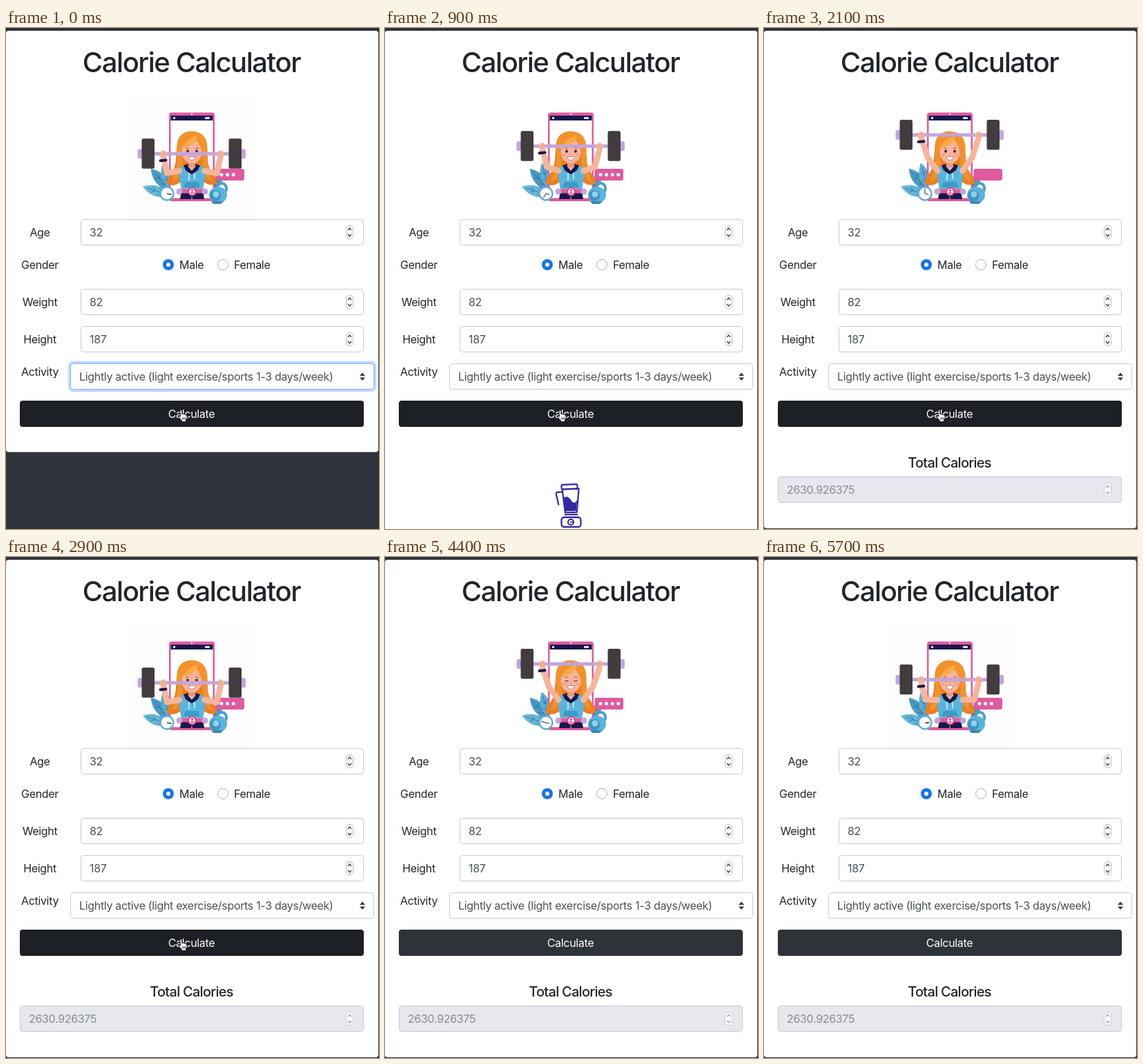
Animation, 540 px wide and 726 px high, one loop 5800 ms. Source, as an HTML page with a canvas:

```html
<!DOCTYPE html>
<html lang="en">
<head>
<meta charset="utf-8">
<title>Calorie Calculator</title>
<style>
html, body { margin: 0; width: 100%; height: 100%; overflow: hidden; background: #2f333b; }
#stage { position: relative; width: 540px; height: 726px; overflow: hidden; }
canvas, svg { position: absolute; left: 0; top: 0; }
span {
  position: absolute; white-space: pre; line-height: 20px; color: #212529;
  font: 400 16px/20px Inter, Roboto, "Liberation Sans", sans-serif;
  letter-spacing: -.02em; font-optical-sizing: none;
}
.mid { transform: translateX(-50%); }
.field { color: #495057; }
</style>
</head>
<body>
<div id="stage">
  <canvas id="view" width="540" height="726"></canvas>
  <svg id="hand" width="540" height="726">
    <path transform="translate(249 553)" fill="#fff" stroke="#15171a" stroke-width="1" stroke-linejoin="round"
      d="M3 2Q3 .5 4.4.5T5.9 2V6.5Q7.6 5.6 8.6 7Q10 6.400 11 7.700Q13 7.500 13 9.500V12Q12.500 14 11.500 15V17.500H5.500V16Q3 13.500 1 10.500Q.5 9 2 8.800L3.500 10.200Z"/>
    <path transform="translate(249 553)" stroke="#15171a" stroke-width=".8" d="M6.700 11V14.500M8.600 11V14.500M10.500 11V14.500"/>
  </svg>
</div>
<script>
const stage = document.getElementById("stage");
const hand = document.getElementById("hand");
const ctx = document.getElementById("view").getContext("2d");
const LOOP = 5800, LIFT = 2900, STEP = 100;
const LOAD_AT = 100, RESULT_AT = 2100, LEAVE_AT = 4300;
const SKIN = "#f6b59b", PINK = "#df5a9e", NAVY = "#17184b", BLUE = "#59b4dc",
      HAIR = "#f3922b", LILAC = "#c3a5dc", INK = "#3528a3";

function label(text, x, y, cls = "", style = {}) {
  const el = document.createElement("span");
  el.textContent = text;
  el.className = cls;
  Object.assign(el.style, { left: x + "px", top: y - 10 + "px" }, style);
  stage.insertBefore(el, hand);
  return el;
}

label("Calorie Calculator", 268.5, 50, "mid", { fontSize: "40px", fontWeight: 500, letterSpacing: "-.036em" });
[["Age", 296], ["Gender", 343], ["Weight", 397], ["Height", 451], ["Activity", 498]]
  .forEach(([s, y]) => label(s, 49, y, "mid"));
[["32", 296], ["82", 397], ["187", 451]].forEach(([s, y]) => label(s, 121, y, "field"));
label("Male", 251, 343);
label("Female", 330, 343);
label("Lightly active (light exercise/sports 1-3 days/week)", 106, 505, "field");
label("Calculate", 268.5, 559, "mid", { color: "#fff" });
const results = [
  label("Total Calories", 268.5, 630, "mid", { fontSize: "20px", fontWeight: 500, letterSpacing: "-.037em" }),
  label("2630.926375", 33, 669, "", { color: "#868c96" })
];

function paint(fill, stroke, width = 1) {
  if (fill) { ctx.fillStyle = fill; ctx.fill(); }
  if (stroke) { ctx.strokeStyle = stroke; ctx.lineWidth = width; ctx.stroke(); }
}
function box(x, y, w, h, r, fill, stroke, width) {
  ctx.beginPath();
  ctx.roundRect(x, y, w, h, r);
  paint(fill, stroke, width);
}
function oval(x, y, rx, ry, fill, stroke, width, turn = 0) {
  ctx.beginPath();
  ctx.ellipse(x, y, rx, ry, turn, 0, Math.PI * 2);
  paint(fill, stroke, width);
}
function shape(d, fill, stroke, width) {
  const p = new Path2D(d);
  if (fill) { ctx.fillStyle = fill; ctx.fill(p); }
  if (stroke) { ctx.strokeStyle = stroke; ctx.lineWidth = width; ctx.stroke(p); }
}

function spinner(y, line, arrow) {
  box(492.5, y - 9.5, 10, 19, 4.5, "#fff", line);
  shape(`M495 ${y - 3}l2.500 -3l2.500 3M495 ${y + 3}l2.500 3l2.500 -3`, null, arrow, 1.3);
}
function input(x, y, w, fill = "#fff") {
  box(x + .5, y - 18.5, w - 1, 37, 4, fill, "#c6cacf");
}

function drawForm(t) {
  [296, 397, 451].forEach(y => { input(108, y, 410); spinner(y, "#b9bbbd", "#3c3e40"); });

  oval(235, 343, 8, 8, "#1673f0");
  oval(235, 343, 3, 3, "#fff");
  oval(314, 343, 7.5, 7.5, "#fff", "#aeb2b7");

  if (t < LOAD_AT) {
    box(91.5, 484.5, 443, 41, 6, null, "#bcdaff", 3.5);
    box(93.5, 486.5, 439, 37, 4, "#fff", "#80b8f5");
  } else input(93, 505, 440);
  shape("M512 504l4 -4.500l4 4.500ZM512 506.500l4 4.500l4 -4.500Z", "#343a40");

  const button = t < LEAVE_AT ? "#1d2024" : t < LEAVE_AT + STEP ? "#272a30" : "#2e3239";
  box(20, 540, 498, 38, 4, button);
}

function leaf(x, y, len, turn, color) {
  ctx.save();
  ctx.translate(x, y);
  ctx.rotate(turn);
  shape(`M0 0Q${-len * .36} ${-len * .5} 0 ${-len}Q${len * .36} ${-len * .5} 0 0Z`, color);
  shape(`M0 0V${-len * .85}M0 ${-len * .3}l5 -5M0 ${-len * .3}l-5 -5M0 ${-len * .55}l4 -5M0 ${-len * .55}l-4 -5`, null, "#2f729f", .8);
  ctx.restore();
}

function barHeight(p) {
  // distance in time from the lowest point of the lift
  const gap = Math.abs((p - 350 + LIFT * 1.5) % LIFT - LIFT / 2);
  const k = Math.min(1, Math.max(0, (gap < 0 ? 0 : gap - 250) / 650));
  return 184 - 29 * (1 - Math.cos(Math.PI * k)) / 2;
}
function dotCount(p) {
  if (p < 200) return 3;
  if (p < 1800) return 4;
  return p < 2200 ? 0 : p < 2400 ? 1 : p < 2600 ? 2 : 3;
}

function drawPhone() {
  box(236, 122.5, 66, 128.5, 4, PINK);
  box(238.5, 127, 61, 119.5, 1, "#fff");
  box(238.5, 127, 61, 7, 0, NAVY);
  oval(269, 125, 1.2, 1.2, "#fff");
  box(242, 129, 3, 3, 0, "#dfe4f5");
  box(288, 129, 7, 3, 1, "#dfe4f5");
}

function drawFace(shut) {
  box(264, 188, 10, 14, 3, "#e79b80");
  shape("M254 170Q255 160 269 159Q284 160 284 171V180Q282 195 269 196Q256 195 254 180Z", SKIN);
  shape("M248 184Q243 151 268 149.500Q296 150 291 186L284 190Q285 174 276 163Q266 172 255 173L254 190Z", HAIR);
  shape("M276 163Q266 172 255 173Q259 163 276 156Z", "#f8ab43");
  shape("M260 174.500q3 -1.500 5 0M274 174.500q3 -1.500 5 0", null, "#a8562c", 1);
  if (shut) shape("M260.500 179q2.500 2 5 0M273.500 179q2.500 2 5 0", null, "#442333", 1.2);
  else {
    oval(263, 178.7, 1.8, 2.1, "#2a1d3a");
    oval(276, 178.7, 1.8, 2.1, "#2a1d3a");
  }
  oval(259.5, 184, 2.5, 1.7, "#f19a8b");
  oval(279, 184, 2.5, 1.7, "#f19a8b");
  shape("M269.500 180v3.500h-1.500", null, "#e18f74", .9);
  shape("M264 186.500H274.500Q273 191.500 269 191.500Q265 191.500 264 186.500Z", "#fff", "#c24f5a", .7);
}

function drawTorso() {
  shape("M253 202Q260 198 264 199L269 205L275 199Q281 198 286 202L289 211L285 235H254L250 211Z", BLUE);
  shape("M257 199Q269 194 281 199L278 206Q274 209 269 212Q263 209 260 206Z", NAVY);
  shape("M263 200H275L269 207Z", SKIN);
  shape("M265 210v11M273 210v9", null, "#fff", 1.2);
  shape("M260 223H278L281 231H257Z", "#3d9bc8");
  box(255, 233, 29, 3, 0, SKIN);
  shape("M254 235H285L287 248H270L269 244L268 248H252Z", NAVY);
  box(249, 233.5, 41, 6, 3, PINK);
  oval(251, 237, 4.5, 4.5, LILAC);
  oval(288, 237, 4.5, 4.5, LILAC);
  oval(269.5, 237, 6.5, 6.5, "#d94a8f");
  oval(269.5, 237, 4.3, 4.3, "#fff");
  oval(269.5, 235.5, 1.8, 1.8, "#d94a8f");
  shape("M266.500 240Q269.500 235.500 272.500 240Z", "#d94a8f");
}

function drawArms(y) {
  const elbowY = 188 + (y - 155) * .82, out = 32 + (y - 155) * .15;
  ctx.lineCap = ctx.lineJoin = "round";
  for (const side of [-1, 1]) {
    const at = d => 269.2 + side * d;
    shape(`M${at(18)} 207L${at(out)} ${elbowY}L${at(41)} ${y + 6}`, null, SKIN, 8.5);
    oval(at(41.5), y + 1, 5, 6, SKIN);
    shape(`M${at(38)} ${y - 1}h${side * 6}M${at(38)} ${y + 2}h${side * 6}`, null, "#e79b80", .8);
  }
  shape(`M223.500 ${y + 10}l8 -.8`, null, NAVY, 4);
  ctx.lineCap = "butt";
  ctx.lineJoin = "miter";
}

function drawBarbell(y) {
  box(190.5, y - 7, 11, 14, 3, LILAC);
  box(336, y - 7, 11, 14, 3, LILAC);
  box(210, y - 2.5, 118, 5, 0, LILAC);
  box(196.5, y - 22, 18.5, 43.5, 2.5, "#423c3e");
  box(322.5, y - 22, 18.5, 43.5, 2.5, "#423c3e");
}

function drawGear(p) {
  oval(233, 240, 9.5, 9.5, "#fff", "#63add5", 2.4);
  shape("M226 231l-2 -2", null, "#4a91c0", 2.5);
  const a = (p - 2100) / LIFT * Math.PI * 2 - Math.PI / 2;
  shape(`M233 240L${233 + 7 * Math.cos(a)} ${240 + 7 * Math.sin(a)}M233 240l5 1.500`, null, "#3b4354", 1.2);

  oval(312, 233, 7, 8, null, "#4b9fca", 4, .3);
  oval(307, 242, 13, 12, BLUE);
  oval(303, 243, 8, 8, "#3f94c2");
  oval(304, 241, 4.5, 4.5, "#8fd0ea");
  shape("M297 251H315L311 255H300Z", "#3f86b5");
}

function drawAthlete(t) {
  const p = t % LIFT, y = barHeight(p);
  if (y > 175) box(179, 97, 180, 180, 0, "#fdfdfd");
  leaf(238, 236, 43, -.72, "#4a9bc5");
  leaf(238, 234, 40, -.28, "#5caed4");
  leaf(238, 243, 42, -1.25, "#65b7da");
  leaf(297, 238, 36, .5, "#4a9bc5");
  drawPhone();
  shape("M249 165C244 185 250 200 236 215Q233 222 232 225Q243 232 254 222H285Q295 231 306 225C303 212 291 207 292 186L288 162Z", "#ea7f22");
  shape("M249 170Q250 200 240 222Q252 222 256 195ZM290 170Q290 200 299 222Q288 222 284 195Z", HAIR);
  box(303.5, 204, 41.5, 17, 3, PINK);
  for (let i = 0; i < dotCount(p); i++) oval(312 + i * 8.6, 212.5, 2.5, 2.5, "#fff");
  drawTorso();
  drawFace((p >= 1400 && p < 1700) || p >= 2700);
  drawBarbell(y);
  drawArms(y);
  drawGear(p);
}

function drawBlender(t) {
  const sway = Math.sin((t - 900) / 160), slosh = 3 * Math.cos((t - 900) / 130);
  ctx.save();
  ctx.lineJoin = "round";
  ctx.translate(269, 708);
  ctx.rotate(-.035 + sway * .035);
  shape("M-11 -40L-8 -6H9L13 -40Z", "#fff", INK, 2.2);
  box(-12, -46.5, 23, 6.5, 2, "#fff", INK, 2.2);
  shape("M-11 -36H-18Q-20 -36 -20 -33L-17 -17", null, INK, 2.2);
  shape(`M-10 ${-24 - slosh}Q-4 ${-29 - slosh} 1 -24T10 ${-27 + slosh}L8 -8H-8Z`, INK);
  ctx.restore();
  shape("M259 703H280L284 721Q284 723 282 723H257Q255 723 255 721Z", "#fff");
  box(255.5, 709, 28, 14, 4, "#fff", INK, 2.3);
  shape("M260 705H279", null, INK, 2.2);
  oval(269, 716, 4, 4, "#fff", INK, 2);
  shape("M268 716h5", null, INK, 1.6);
}

function draw(t) {
  const loading = t >= LOAD_AT && t < RESULT_AT, done = t >= RESULT_AT;
  ctx.fillStyle = "#2f333b";
  ctx.fillRect(0, 0, 540, 726);
  box(0, 4, 539, (loading ? 760 : done ? 725 : 614.5) - 4, 4, "#fff");
  drawAthlete(t);
  drawForm(t);
  if (loading) drawBlender(t);
  if (done) {
    input(20, 669, 498, "#e6e8ed");
    spinner(669, "#c9cbd0", "#a0a3a9");
  }
  results.forEach(el => el.style.display = done ? "" : "none");
  hand.style.display = t < LEAVE_AT ? "" : "none";
}

let start;
function tick(now) {
  start ??= now;
  draw(Math.floor(((now - start + 4) % LOOP) / STEP) * STEP);
  requestAnimationFrame(tick);
}
draw(0);
requestAnimationFrame(tick);
</script>
</body>
</html>
```
